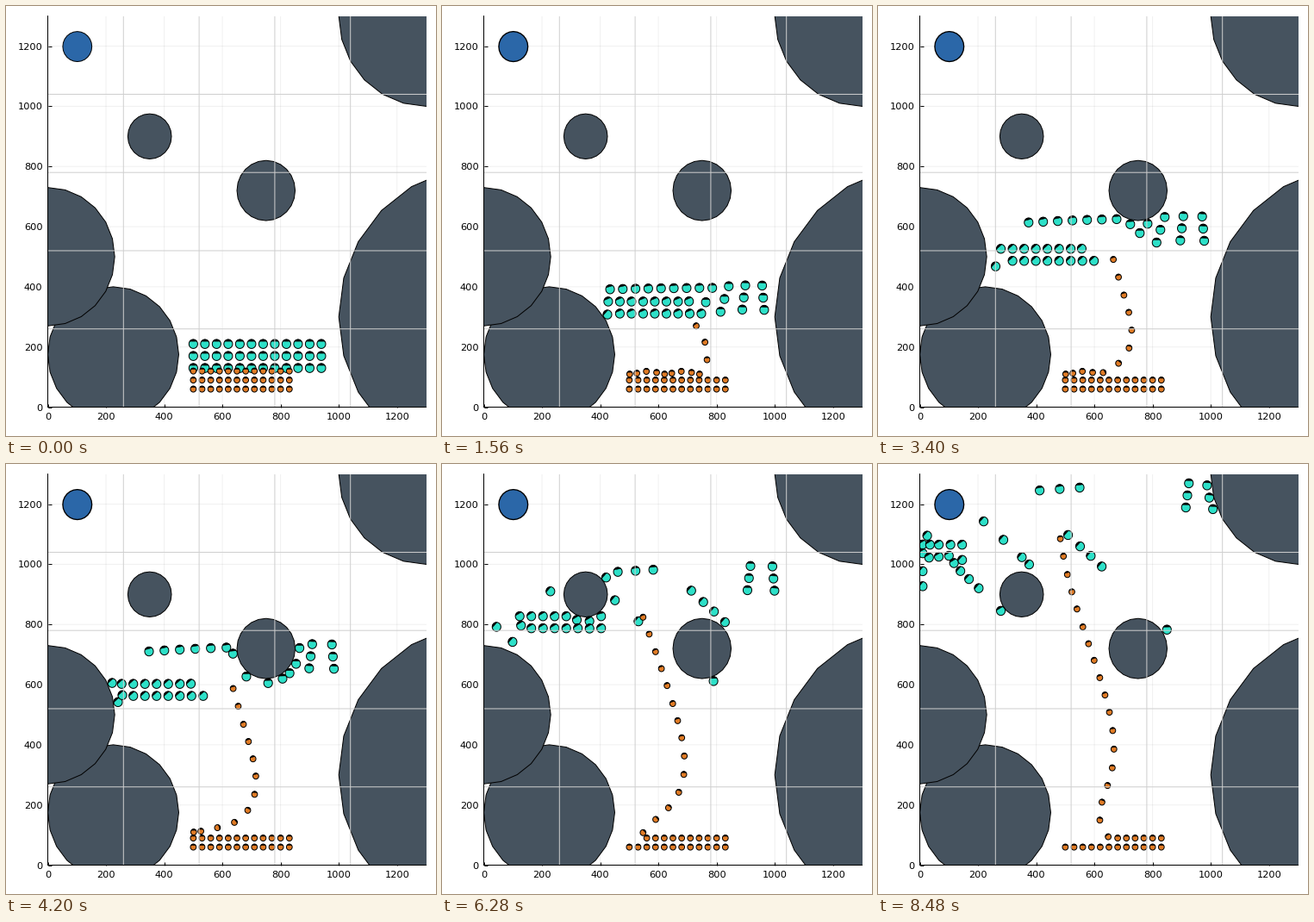
Animation of 499x499 px, one loop 8520 ms. Source, as a matplotlib script:

```python
import numpy as np
import matplotlib.pyplot as plt
from matplotlib.animation import FuncAnimation
from matplotlib.collections import PolyCollection

FRAMES, STEP_MS, SIZE = 213, 40, 499
X0, Y0, SX, SY = 48.5, 465.5, 0.3377, 0.3491   # axes origin and px per unit
PX = 0.72                                      # one pixel in points
R_BIG, R_SMALL, GAP, SPEED, CELL = 15, 10, 63, 5, 260
GOAL = (100, 1200)
SLATE, BLUE, CYAN, ORANGE = "#46535f", "#2b67a8", "#2de0c8", "#e07b25"
OBSTACLES = [(1300, 1300, 300), (1500, 300, 500), (225, 175, 225),
             (0, 500, 230), (750, 720, 100), (350, 900, 75)]

# route of the agent that leads the queue
LEAD_T = [0, 39, 105, 178, 212]
LEAD_X = [830, 730, 637, 511, 483]
LEAD_Y = [120, 270, 587, 920, 1085]


def block(xs, ys):
    return np.array([(x, y) for y in ys for x in xs], float)


def push_out(points, center, dist):
    """Move points closer than dist to center radially outwards."""
    d = points - center
    n = np.maximum(np.hypot(d[:, 0], d[:, 1]), 1e-6)[:, None]
    return np.where(n < dist, center + d / n * dist, points), n[:, 0] < dist


def separate(points, dist):
    """Push overlapping points apart, half the overlap each."""
    d = points[:, None] - points[None]
    n = np.hypot(d[..., 0], d[..., 1])
    np.fill_diagonal(n, np.inf)
    overlap = np.clip(dist - n, 0, None)
    return points + (d * (overlap / np.maximum(n, 1e-6) / 2)[..., None]).sum(axis=1)


def crowd():
    """Yield positions and headings of the crowd, step by step.

    The rear left part fans out to the left, the rest walks upwards;
    whoever has met an obstacle hugs it and then bears left.
    """
    pos = block(range(500, 941, 40), (210, 170, 130))
    row, col = np.divmod(np.arange(len(pos)), 12)
    left = col < 7 + row
    left &= row > 0
    touched = np.zeros(len(pos), bool)
    contact = touched.copy()
    yield pos, np.full(len(pos), np.pi / 2)
    for t in range(1, FRAMES):
        fan = -0.4 if t <= 39 else -0.85 if t <= 105 else -0.58
        start = np.clip(-0.6 + 0.25 * (col - 8), -0.6, 0.15)
        ahead = np.where(pos[:, 1] < CELL, start, 0.03 * (col - 9))
        slope = np.where(left, fan, ahead)
        slope = np.where(touched & ~contact, -1.1, slope)
        ang = np.pi / 2 - np.arctan(slope)
        pos = pos + SPEED * np.column_stack([np.cos(ang), np.sin(ang)])
        pos = separate(pos, 2 * R_BIG)
        contact = np.zeros(len(pos), bool)
        for x, y, r in OBSTACLES:
            pos, hit = push_out(pos, (x, y), r + R_BIG)
            contact |= hit
        touched = touched | contact
        pos[:, 0] = np.maximum(pos[:, 0], R_SMALL)
        yield pos, ang


def simulate():
    """Crowd plus a queue where each agent chases the one before it."""
    queue = np.vstack([block(range(830, 499, -30), [120]),
                       block(range(500, 831, 30), [90, 60])])
    ang = np.full(len(queue), np.pi / 2)
    states = []
    for i, (big, big_ang) in enumerate(crowd()):
        if i:
            queue, ang = queue.copy(), ang.copy()
            lead = np.array([np.interp(i, LEAD_T, LEAD_X), np.interp(i, LEAD_T, LEAD_Y)])
            ang[0] = np.arctan2(*(lead - queue[0])[::-1])
            queue[0] = lead
            for j in range(1, 24):
                d = queue[j - 1] - queue[j]
                dist = np.hypot(*d)
                if dist > GAP:
                    queue[j] += d / dist * SPEED
                    ang[j] = np.arctan2(d[1], d[0])
            for c in big:
                queue[1:] = push_out(queue[1:], c, R_BIG + R_SMALL)[0]
        states.append((big, big_ang, queue, ang))
    return states


def disc(x, y, r, n=24):
    t = np.linspace(0, 2 * np.pi, n, endpoint=False)
    return np.column_stack([x + r * np.cos(t), y + r * np.sin(t)])


def cap(x, y, r, ang):
    t = ang + np.linspace(-0.95, 0.95, 9)
    return np.column_stack([x + r * np.cos(t), y + r * np.sin(t)])


fig = plt.figure(figsize=(SIZE / 100, SIZE / 100), dpi=100, facecolor="white")
ax = fig.add_axes([X0 / SIZE, 1 - Y0 / SIZE, 1300 * SX / SIZE, 1300 * SY / SIZE])
ax.set(xlim=(0, 1300), ylim=(0, 1300))
for side in ("top", "right"):
    ax.spines[side].set_visible(False)
for side in ("left", "bottom"):
    ax.spines[side].set(linewidth=PX, zorder=9, snap=False)
ticks = range(0, 1201, 200)
ax.set_xticks(ticks)
ax.set_yticks(ticks)
ax.tick_params(direction="in", length=4 * PX, width=PX, labelsize=8.2,
               labelfontfamily="DejaVu Sans")
ax.tick_params(axis="x", pad=4.6)
ax.tick_params(axis="y", pad=4.3)
ax.set_axisbelow(True)
ax.grid(color="black", alpha=0.06, linewidth=PX, snap=False)


def polys(verts, color, z, width=PX):
    c = PolyCollection(verts, facecolors=color, edgecolors="black", linewidths=width, zorder=z)
    ax.add_collection(c, autolim=False)
    return c


polys([disc(*o) for o in OBSTACLES], SLATE, 3)
goal = polys([disc(*GOAL, 50)], BLUE, 3)
big_body, big_cap = polys([], CYAN, 4), polys([], "black", 5, 0.3)
small_body, small_cap = polys([], ORANGE, 6), polys([], "black", 7, 0.3)
for v in range(CELL, 1300, CELL):
    ax.axvline(v, color="#cfcfcf", linewidth=PX, zorder=8, snap=False)
    ax.axhline(v, color="#cfcfcf", linewidth=PX, zorder=8, snap=False)

STATES = simulate()


def place(body, tip, pos, ang, r):
    body.set_verts([disc(x, y, r) for x, y in pos])
    tip.set_verts([cap(x, y, r, a) for (x, y), a in zip(pos, ang)])


def draw(i):
    big, big_ang, small, small_ang = STATES[i]
    place(big_body, big_cap, big, big_ang, R_BIG)
    place(small_body, small_cap, small, small_ang, R_SMALL)
    goal.set_linewidth(PX if i == 0 else 1.35 * PX)
    return goal, big_body, big_cap, small_body, small_cap


anim = FuncAnimation(fig, draw, frames=FRAMES, interval=STEP_MS, repeat=True,
                     repeat_delay=0, blit=False)
plt.show()
```
